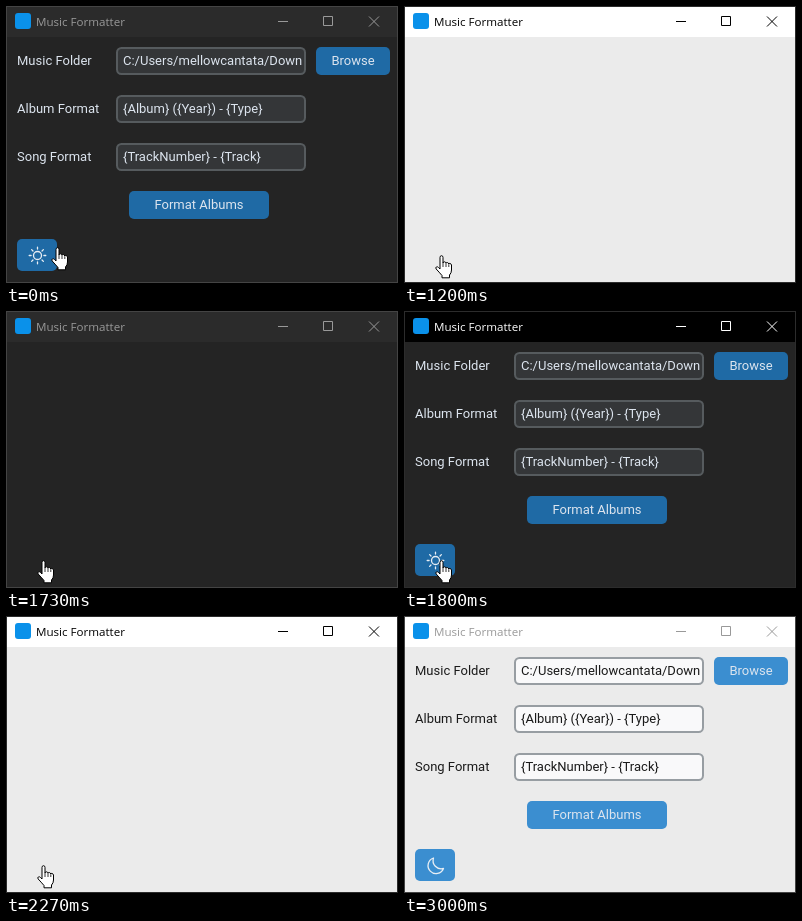
Recreate the animation shown at these times as an HTML page. Size 392 by 277 pixels, loop 3070 ms.

```html
<!DOCTYPE html>
<html lang="en">
<head>
<meta charset="utf-8">
<title>Music Formatter</title>
<style>
  html, body { margin: 0; width: 100%; height: 100%; overflow: hidden; }
  svg {
    display: block; width: 392px; height: 277px;
    font: 13px Roboto, sans-serif;
    --bg: #ebebeb; --text: #1a1a1a;
    --field: #f9f9fa; --edge: #979da2;
    --button: #3b8ed0; --hover: #36719f;
    --bar: #fff; --caption: #000; --frame: #2c2c2c;
  }
  .dark {
    --bg: #242424; --text: #dce4ee;
    --field: #343638; --edge: #565b5e;
    --button: #1f6aa5; --hover: #144870;
    --bar: #000; --caption: #fff;
  }
  .inactive { --caption: #999; --frame: #444; }
  .dark.inactive { --bar: #2b2b2b; --caption: #999; }
  text { fill: var(--text); }
  .caption { font: 11.6px "Open Sans", sans-serif; fill: var(--caption); }
  .controls { fill: none; stroke: var(--caption); }
  .field { fill: var(--field); stroke: var(--edge); stroke-width: 2; }
  .button { fill: var(--button); }
  .label { fill: #dce4ee; text-anchor: middle; }
  .icon { fill: none; stroke: #e8eef4; stroke-width: 1.3; stroke-linecap: round; stroke-linejoin: round; }
  .hover #toggle { fill: var(--hover); }
  .blank #content, .dark #moon, svg:not(.dark) #sun { display: none; }
</style>
</head>
<body>
<svg id="window" viewBox="0 0 392 277">
  <rect width="392" height="277" fill="var(--bg)"/>
  <rect width="392" height="31" fill="var(--bar)"/>
  <rect x="9" y="7" width="16" height="16" rx="3" fill="#0a91ea"/>
  <text class="caption" x="30" y="20">Music Formatter</text>
  <path class="controls" d="M272 15.5h10M317.5 10.5h9v9h-9zM363 10.5l10 10m0-10l-10 10"/>
  <rect x=".5" y=".5" width="391" height="276" fill="none" stroke="var(--frame)"/>

  <g id="content">
    <g id="rows"></g>
    <rect class="button" x="310" y="41" width="74" height="28" rx="5"/>
    <text class="label" x="347" y="59">Browse</text>
    <rect class="button" x="123" y="185" width="140" height="28" rx="5"/>
    <text class="label" x="193" y="203">Format Albums</text>
    <rect class="button" id="toggle" x="11" y="233" width="40" height="32" rx="5"/>
    <g class="icon" transform="translate(31.5 249.5)">
      <g id="sun"><circle r="4"/><path id="rays"/></g>
      <path id="moon" d="M-2-7.5A8 8 0 1 0 8 3A8.2 8.2 0 0 1-2-7.5Z"/>
    </g>
  </g>

  <g id="cursor" stroke="#000" stroke-linejoin="round">
    <path fill="#fff" d="M5 14V2.5Q5 .7 6.5 .7T8 2.5V8Q8.2 6.7 9.5 6.8T11 8.3Q11.2 7.3 12.3 7.5T13.8 9Q14 8.2 15 8.4T16.5 10V15Q16.5 18 14.5 20V22.8H7V20.5Q4 17 1.2 14Q.3 12.8 1.3 12T3.6 12.6Z"/>
    <path fill="none" stroke-width=".8" d="M8 8v4M11 8.5V12M13.8 9.2V12"/>
  </g>
</svg>
<script>
const LOOP = 3070;
const find = id => document.getElementById(id);
const win = find('window'), cursor = find('cursor');

const rows = [
  ['Music Folder', 'C:/Users/mellowcantata/Down'],
  ['Album Format', '{Album} ({Year}) - {Type}'],
  ['Song Format', '{TrackNumber} - {Track}'],
];
find('rows').innerHTML = rows.map(([name, value], i) => `
  <g transform="translate(0 ${41 + 48 * i})">
    <text x="11" y="18">${name}</text>
    <rect class="field" x="111" y="1" width="188" height="26" rx="4.5"/>
    <text x="117" y="18">${value}</text>
  </g>`).join('');

find('rays').setAttribute('d', Array.from({ length: 8 }, (_, i) => {
  const x = Math.cos(i * Math.PI / 4), y = Math.sin(i * Math.PI / 4);
  return `M${6.4 * x} ${6.4 * y}L${8.3 * x} ${8.3 * y}`;
}).join(''));

// Start time, window classes, cursor position (omitted when it is outside)
const rest = [31, 249];
const states = [
  [0, 'dark inactive', [45, 241]],
  [70, 'dark inactive hover', [34, 247]],
  [130, 'dark inactive hover', rest],
  [1200, 'blank', rest],
  [1270, '', rest],
  [1330, 'hover', rest],
  [1730, 'dark inactive blank', rest],
  [1800, 'dark', rest],
  [1870, 'dark hover', rest],
  [2270, 'blank', rest],
  [2330, '', rest],
  [2400, 'hover', rest],
  [2460, '', [36, 264]],
  [2530, ''],
  [3000, 'inactive'],
];

let shown;
function render() {
  const time = performance.now() % LOOP;
  const state = states.findLast(([start]) => start <= time);
  if (state !== shown) {
    const [, classes, position] = shown = state;
    win.setAttribute('class', classes);
    cursor.setAttribute('visibility', position ? 'visible' : 'hidden');
    if (position) cursor.setAttribute('transform', `translate(${position})`);
  }
  requestAnimationFrame(render);
}
render();
</script>
</body>
</html>
```
